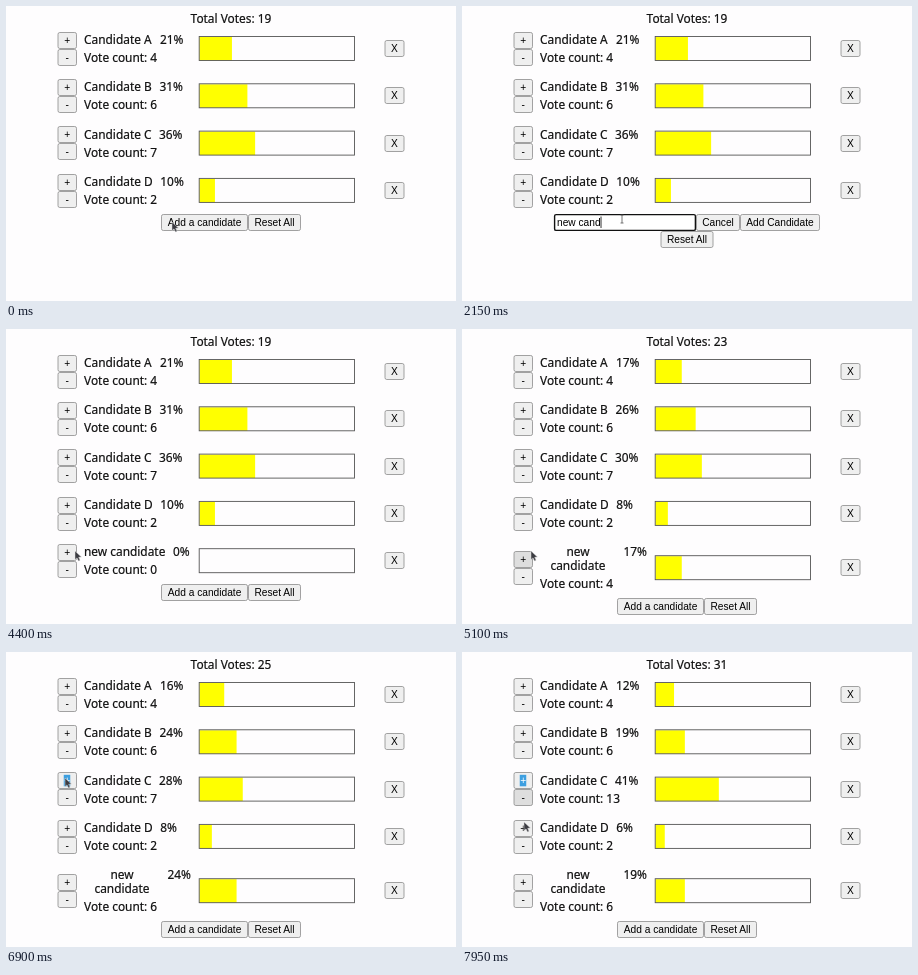
An HTML page that plays this animation: 450 px wide and 295 px high, repeating every 8000 ms.

```html
<!DOCTYPE html>
<html lang="en">
<head>
<meta charset="utf-8">
<title>Vote counter</title>
<style>
html, body { margin: 0; width: 100%; height: 100%; overflow: hidden; background: #fefdfe; }
svg { display: block; width: 450px; height: 295px; }
text { font: 11.9px "Noto Sans", sans-serif; fill: #111; stroke: #111; stroke-width: .2; }
.ui { font: 10.2px "Liberation Sans", Arial, sans-serif; fill: #000; stroke: none; }
.mid { text-anchor: middle; }
.hint { fill: #757575; }
</style>
</head>
<body>
<svg id="stage" viewBox="0 0 450 295"></svg>
<script>
const LOOP = 8000, OPEN = 450, SUBMIT = 2850, SELECT = 6500, HOVER_LAG = 100;
const PITCH = 47.3, BUTTON_H = 17;
const ENTRY = "new candidate";
const keyTimes = [1250, 1350, 1450, 1650, 1800, 1900, 2000, 2100, 2200, 2350, 2550, 2650, 2700];
const newClicks = [4500, 4650, 4800, 5000, 5150, 5300];
const cClicks = [6950, 7080, 7200, 7330, 7450, 7580];

// pointer path: time, x, y
const path = [
  [0, 166, 216], [500, 166, 216], [850, 160, 213], [3450, 160, 213],
  [4350, 69, 222], [5400, 69, 222], [5600, 60, 128], [5660, 60, 130],
  [5750, 61, 144.5], [6050, 61, 144.5], [6250, 59, 126], [7700, 59, 126],
  [7950, 62, 170], [8000, 62, 170]
];

const stage = document.getElementById("stage");
const ruler = document.createElement("canvas").getContext("2d");
ruler.font = '10.2px "Liberation Sans", Arial, sans-serif';

const countPast = (times, t) => times.filter(x => t >= x).length;

function pointerAt(t) {
  const i = Math.max(1, path.findIndex(p => p[0] >= t));
  const [t0, x0, y0] = path[i - 1], [t1, x1, y1] = path[i];
  const k = (t - t0) / (t1 - t0);
  return [x0 + (x1 - x0) * k, y0 + (y1 - y0) * k];
}

const label = (x, y, s, cls = "") => `<text x="${x}" y="${y}" class="${cls}">${s}</text>`;

const box = (x, y, w, h, fill, stroke, more = "") =>
  `<rect x="${x}" y="${y}" width="${w}" height="${h}" fill="${fill}" stroke="${stroke}" ${more}/>`;

function button(x, top, w, s, [hx, hy], selected) {
  const y = Math.round(top);
  const hot = !selected && hx >= x && hx <= x + w && hy >= y && hy <= y + BUTTON_H;
  const mid = x + w / 2;
  return box(x + .5, y + .5, w - 1, BUTTON_H - 1, hot ? "#dedede" : "#efefef", "#8c8c8c", 'rx="1.8" stroke-width=".8"') +
    (selected ? box(mid - 3.5, y + 2.8, 6.5, 11.5, "#3d9fe0", "none") : "") +
    `<text x="${mid}" y="${y + 11.8}" class="ui mid"${selected ? ' style="fill:#fff"' : ""}>${s}</text>`;
}

function row(i, name, votes, total, pctX, t, hover) {
  const y = PITCH * i;
  const pct = Math.floor(votes * 100 / total);
  const wrap = i === 4 && pct > 9;
  const dy = y + (wrap ? 7 : 0);
  const nameText = wrap
    ? label(116, y + 38, "new", "mid") + label(116, y + 52.2, "candidate", "mid")
    : label(78, y + 38, name);
  return button(51.5, dy + 25.7, 19.5, "+", hover, i === 2 && t >= SELECT) +
    button(51.5, dy + 42.7, 19.5, "-", hover) +
    nameText +
    label(wrap ? 161.5 : pctX, y + 38, pct + "%") +
    label(78, y + (wrap ? 69.8 : 55.9), "Vote count: " + votes) +
    box(193.5, dy + 31, 1.545 * pct, 23.5, "#ff0", "none") +
    box(193.2, dy + 30.5, 155.3, 24, "none", "#555", 'stroke-width=".9"') +
    button(378.5, dy + 34, 20, "X", hover);
}

function entryForm(t, hover) {
  const typed = ENTRY.slice(0, countPast(keyTimes, t));
  const lastKey = keyTimes.filter(x => x <= t).pop() || OPEN;
  const caretX = 95 + ruler.measureText(typed).width;
  const caretOn = (t - lastKey) % 1000 < 500;
  return box(92.6, 208.6, 140.8, 15.8, "#fff", "#111", 'rx="1.5" stroke-width="1.4"') +
    label(95, 219.8, typed || "enter name of candidate...", typed ? "ui" : "ui hint") +
    (caretOn ? box(caretX, 210.5, .8, 11.5, "#000", "none") : "") +
    button(234, 208, 44, "Cancel", hover) +
    button(278, 208, 80, "Add Candidate", hover) +
    button(198.5, 225, 53, "Reset All", hover);
}

function pointer(x, y, beam) {
  const d = beam
    ? "M-1.5 -4H1.5M0 -4V4M-1.5 4H1.5"
    : "M0 0V8.6L2 6.9 3.5 10 5.1 9.3 3.7 6.3 6.4 6z";
  const paint = beam ? 'fill="none" stroke="#555" stroke-width=".8"'
    : 'fill="#3c3c42" stroke="#ddd" stroke-width=".5"';
  return `<path transform="translate(${x} ${y})" d="${d}" ${paint}/>`;
}

function draw(t) {
  const added = countPast(newClicks, t);
  const c = 7 + countPast(cClicks, t);
  const total = 12 + c + added;
  const hover = pointerAt(Math.max(0, t - HOVER_LAG));
  const editing = t >= OPEN && t < SUBMIT;
  const rows = [
    ["Candidate A", 4, 154], ["Candidate B", 6, 153.5],
    ["Candidate C", c, 153], ["Candidate D", 2, 154.3]
  ];
  if (t >= SUBMIT) rows.push([ENTRY, added, 167]);

  let out = label(225, 16.5, "Total Votes: " + total, "mid");
  rows.forEach(([name, votes, x], i) => out += row(i, name, votes, total, x, t, hover));
  if (editing) out += entryForm(t, hover);
  else {
    const y = 208 + (t < SUBMIT ? 0 : PITCH) + (added < 3 ? 0 : 14);
    out += button(155, y, 87, "Add a candidate", t < OPEN ? [0, 0] : hover) +
      button(242, y, 53, "Reset All", hover);
  }
  const [x, y] = pointerAt(t);
  stage.innerHTML = out + pointer(x, y, editing && x < 164);
}

const start = performance.now();
function tick() {
  draw((performance.now() - start) % LOOP);
  requestAnimationFrame(tick);
}
tick();
</script>
</body>
</html>
```
